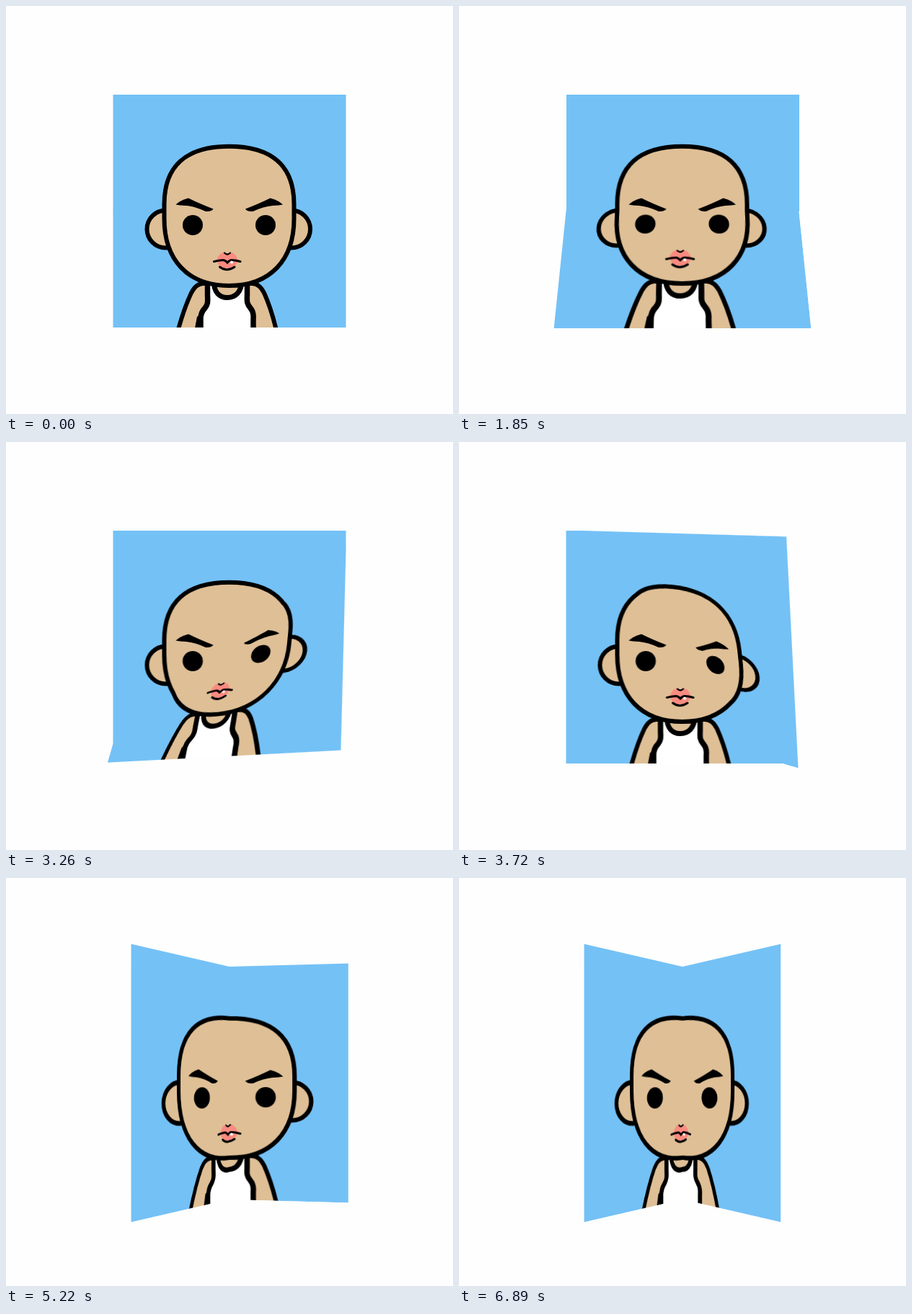
An HTML page for the animation above (7.15 s loop, 620 by 566 pixels).

```html
<!DOCTYPE html>
<html lang="en">
<head>
<meta charset="utf-8">
<title>Folding portrait</title>
<style>
  html, body { margin: 0; width: 100%; height: 100%; overflow: hidden; background: #fdfefd; }
  .card {
    position: absolute; left: 0; top: 0; width: 323px; height: 323px;
    transform: translate(148.5px, 123px);
    perspective: 700px;
  }
  .card svg { position: absolute; inset: 0; width: 100%; height: 100%; overflow: hidden; }
</style>
</head>
<body>
<div class="card">
  <svg viewBox="148.5 123 323 323">
    <rect x="148" y="122" width="325" height="325" fill="#74c1f6"/>
    <g fill="#dfbf96" stroke="#000" stroke-width="6">
      <!-- body -->
      <path d="M275 385Q264 384 257 398Q247 419 238 452H375.500Q368 420 358 398Q351 384 340 385Z"/>
      <path fill="#000" stroke="none" d="M262 447L265 431L273 427V447Z"/>
      <path fill="#fff" stroke-width="7.500" d="M279.500 380V400C279.500 408 281 413 276 419Q270 425 270 434V454H343V434Q344 425 339 419C333 412 334.500 408 334.500 400V380Z"/>
      <path stroke-width="7" d="M288 380C288 397 296 404.500 307 404.500S327 397 327 380Z"/>
      <!-- head -->
      <circle cx="221.500" cy="309.500" r="26"/>
      <circle cx="396" cy="309.500" r="26"/>
      <path d="M309.500 194.700C369 194.700 399.500 222 399.500 275V295C399.500 352 367 388 309.500 388S219.500 352 219.500 295V275C219.500 222 250 194.700 309.500 194.700Z"/>
    </g>
    <path id="brow" d="M235.500 275.500C240 271 247 268 253 266.500Q268 274 287.500 281.500Q285 285.500 277 285Q262 278 250 277Q241 276.500 235.500 275.500Z"/>
    <use href="#brow" transform="matrix(-1 0 0 1 619.500 0)"/>
    <circle cx="259" cy="304" r="14"/>
    <circle cx="360" cy="304" r="14"/>
    <!-- mouth -->
    <path fill="#f98b80" d="M292 353C295 344 301 339 307 344C313 339 319 344 322 353C319 361 314 364 307 364S295 361 292 353Z"/>
    <g fill="none" stroke="#000" stroke-width="3" stroke-linecap="round">
      <path d="M288.500 354.500Q297 352.500 301 352.500Q304 352.500 307 356Q310 352.500 313 352.500Q318 352.500 325 354.500"/>
      <path stroke-width="2.200" d="M303 342.500Q307 346.500 311 342.500"/>
      <path d="M296.500 362Q306 369.500 317 362"/>
    </g>
    <circle cx="313" cy="355.500" r="2" fill="#fff"/>
  </svg>
</div>
<script>
const LOOP = 7150;
const CENTER = 161.5;
const REACH = 400;
const OVERLAP = 0.6;

// Each track eases from one angle (degrees) to another.
const tracks = {
  firstFold:  { start: 812,  span: 1990, from: 0, to: 45 },
  creaseTurn: { start: 2715, span: 2050, from: 0, to: 270 },
  secondFold: { start: 4680, span: 2000, from: 0, to: 45 }
};

const card = document.querySelector('.card');
const firstHalf = card.firstElementChild;
const secondHalf = firstHalf.cloneNode(true);
card.prepend(secondHalf);

// cubic-bezier(.42, 0, .58, 1)
function easeInOut(x) {
  let low = 0, high = 1;
  for (let i = 0; i < 24; i++) {
    const s = (low + high) / 2;
    if (1.26 * s - 0.78 * s * s + 0.52 * s ** 3 < x) low = s;
    else high = s;
  }
  return low * low * (3 - 2 * low);
}

function angleAt({ start, span, from, to }, time) {
  const x = Math.min(1, Math.max(0, (time - start) / span));
  if (x === 0) return from;
  if (x === 1) return to;
  return from + (to - from) * easeInOut(x);
}

// Shows the half that lies on one side of the crease, lifted towards the viewer.
function foldHalf(half, direction, angle) {
  const turn = direction * Math.PI / 180;
  const sin = Math.sin(turn), cos = Math.cos(turn);
  const point = (along, away) =>
    `${CENTER + cos * along + sin * away}px ${CENTER - sin * along + cos * away}px`;
  half.style.clipPath = `polygon(${[
    point(-REACH, -OVERLAP), point(REACH, -OVERLAP), point(REACH, REACH), point(-REACH, REACH)
  ].join()})`;
  half.style.transform = angle ? `rotate3d(${cos}, ${-sin}, 0, ${angle}deg)` : 'none';
}

function draw() {
  const time = performance.now() % LOOP;
  const direction = angleAt(tracks.creaseTurn, time);
  foldHalf(firstHalf, direction, angleAt(tracks.firstFold, time));
  foldHalf(secondHalf, direction + 180, angleAt(tracks.secondFold, time));
  requestAnimationFrame(draw);
}
draw();
</script>
</body>
</html>
```
